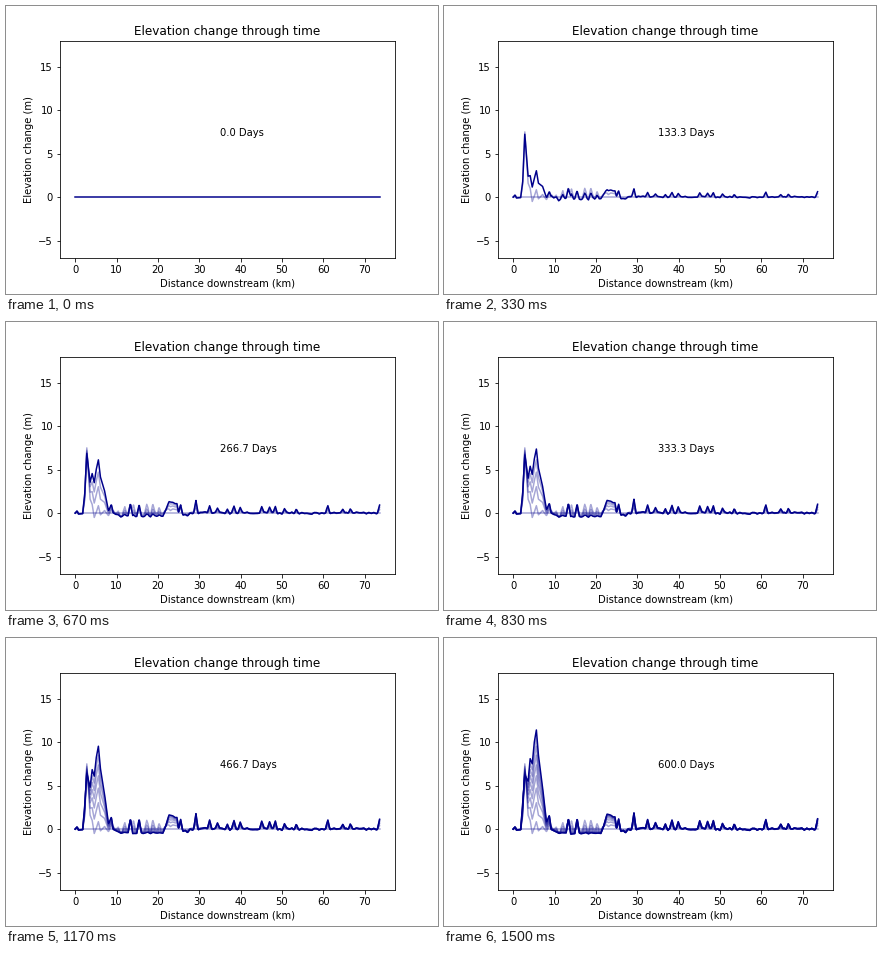
Animation, 432 px wide and 288 px high, one loop 1.67 s. Source, as a matplotlib script:

```python
import numpy as np
import matplotlib.pyplot as plt
from matplotlib.animation import FuncAnimation

LENGTH = 73.6
STEPS = 10
DAYS = np.linspace(0, 600, STEPS)
TICKS = 167  # 10 ms each

rng = np.random.default_rng(4)
km = np.linspace(0, LENGTH, 737)

# Upstream pile: outline after the first step and at the end
pile_km = [0, .45, .8, 1.8, 2.3, 2.8, 3.6, 4.1, 4.6, 5.1, 5.6, 6.1, 7.1, 8.05, 8.75, 9.2]
pile_first = [0, .25, -.1, -.05, 1.5, 7.5, 1.6, 1, -.5, .1, .85, -.2, .3, -.3, .4, 0]
pile_last = [0, .25, -.1, -.05, 3, 6.2, 5.5, 8.1, 7.5, 10, 11.4, 8.5, 4.8, .8, 1.6, 0]

# Short-lived bars, and lasting bars as km: height
early_bars = [12, 13.35, 14.1, 17.3, 18.75, 20.25]
late_bars = {13.35: 1.7, 15.45: 1.7, 25.5: 1.2, 29.2: 1.8, 32.5: 1, 34.4: .8,
             36.8: .5, 38.4: .95, 39.9: .8, 45.1: .9, 47: .8, 48.4: 1,
             50.6: .6, 53.4: .5, 61.1: 1.1, 64.7: .5, 66.5: .6, LENGTH: 1.2}


def bar(center, height, half=0.55):
    return height * np.clip(1 - np.abs(km - center) / half, 0, None)


def ripples(size_km, size):
    """Jagged noise whose strength follows the given key points."""
    nodes = np.arange(9.2, LENGTH, 0.6)
    noise = rng.uniform(-1, 1, nodes.size) * np.interp(nodes, size_km, size)
    return np.interp(km, nodes, noise, left=0)


first = np.interp(km, pile_km, pile_first)
last = np.interp(km, pile_km, pile_last)
bed = np.interp(km, [9.2, 11.2, 21.2, 22.7, 24.6, 25, 27, 28.7],
                [0, -.5, -.5, 1.6, 1.4, 0, -.3, 0])
early = (sum(bar(c, 0.9) for c in early_bars)
         + ripples([9, 22, 29, 35], [.35, .3, .2, .05]))
late = (sum(bar(c, h) for c, h in late_bars.items())
        + ripples([9, 25, 30, 70], [.08, .15, .18, .15]))


def profile(step):
    """Elevation change along the channel after the given step."""
    if step == 0:
        return np.zeros_like(km)
    spread = (np.sqrt(step) - 1) / 2
    grow = (1 - np.exp(-DAYS[step] / 200)) / (1 - np.exp(-3))
    fade = np.exp((1 - step) / 2)
    return first + (last - first) * spread + (bed + late) * grow + early * fade


fig = plt.figure(figsize=(6, 4), dpi=72, facecolor="white")
ax = fig.add_axes([0.125, 0.125, 0.775, 0.755])
ax.set_title("Elevation change through time")
ax.set_xlabel("Distance downstream (km)")
ax.set_ylabel("Elevation change (m)")
ax.set_xlim(-0.05 * LENGTH, 1.05 * LENGTH)
ax.set_ylim(-7, 18)

lines = [ax.plot(km, profile(i), color="darkblue", lw=1.5)[0]
         for i in range(STEPS)]
label = ax.text(35, 7, "")


def update(tick):
    step = (6 * tick + 2) // 100  # changes every 160 or 170 ms
    for i, line in enumerate(lines):
        line.set_visible(i <= step)
        line.set_alpha(1 if i == step else 0.35)
    label.set_text(f"{DAYS[step]:.1f} Days")
    return [*lines, label]


anim = FuncAnimation(fig, update, frames=TICKS, interval=10,
                     repeat=True, repeat_delay=0)
plt.show()
```
